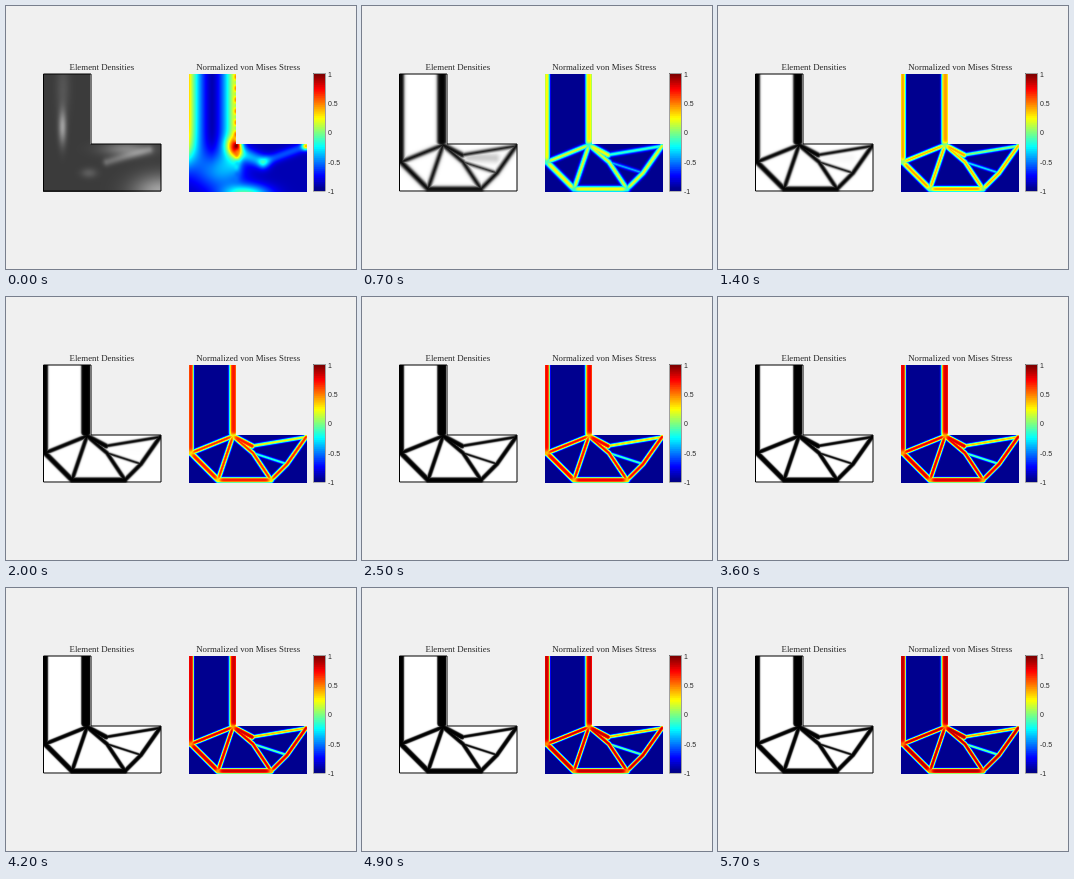
Write an HTML page with a canvas that moves like this. It is 350 px wide and 263 px high and loops after 5.8 s.

```html
<!DOCTYPE html>
<html lang="en">
<head>
<meta charset="utf-8">
<title>Stress-based topology optimization</title>
<style>
html, body { margin: 0; width: 100%; height: 100%; overflow: hidden; background: #f0f0f0; }
canvas, svg { position: absolute; left: 0; top: 0; width: 100%; height: 100%; display: block; }
.title { font: 8.85px "Liberation Serif", serif; text-anchor: middle; fill: #262626; }
.tick { font: 7px "Liberation Sans", sans-serif; fill: #262626; }
</style>
</head>
<body>
<canvas id="fields" width="350" height="263"></canvas>
<svg viewBox="0 0 350 263">
  <path d="M37.5 68H85V138H155V185H37.5Z" fill="none" stroke="#000" stroke-linejoin="round"/>
  <text class="title" x="95.8" y="64.2">Element Densities</text>
  <text class="title" x="242.2" y="64.2">Normalized von Mises Stress</text>
  <rect x="307.7" y="67.7" width="11.6" height="117.4" fill="none" stroke="#262626" stroke-width=".4"/>
  <g id="ticks"></g>
</svg>
<script>
const STEP = 100, STEPS = 58, SIZE = 118, NEUTRAL_AXIS = 23;
const ctx = document.getElementById('fields').getContext('2d');

const clamp = (v, a = 0, b = 1) => Math.min(b, Math.max(a, v));
const mix = (a, b, t) => a + (b - a) * t;
const sigmoid = v => 1 / (1 + Math.exp(-v));
const inside = (x, y) => x < 47.5 || y > 70;

// Truss joints, in pixels from the panel's top left corner
const heel = [2, 88], node = [44, 71], hub = [63, 81], bend = [64, 88];
const footLeft = [29, 115], footRight = [82, 115], knee = [98, 99], tip = [117, 72];

const chain = (half, ...points) => points.slice(1).map((to, i) => ({ half, from: points[i], to }));
const members = [
  ...chain(3, [2, -8], heel),
  ...chain(4.8, [43, -8], [43, 67]),
  ...chain(2.6, heel, footLeft, footRight),
  ...chain(2.1, footRight, knee, tip),
  ...chain(2, heel, node, footLeft),
  ...chain(2, node, bend, footRight),
  ...chain(2.5, node, hub),
  ...chain(1.5, hub, tip),
  ...chain(1.1, bend, knee)
];

function segDistance(x, y, [x1, y1], [x2, y2]) {
  const dx = x2 - x1, dy = y2 - y1;
  const t = clamp(((x - x1) * dx + (y - y1) * dy) / (dx * dx + dy * dy));
  return Math.hypot(x - x1 - t * dx, y - y1 - t * dy);
}

const blob = (x, y, [cx, cy], rx, ry = rx) => Math.exp(-(((x - cx) / rx) ** 2) - ((y - cy) / ry) ** 2);
const streak = (x, y, from, to, r) => Math.exp(-((segDistance(x, y, from, to) / r) ** 2));

function jet(v) {
  const t = clamp((v + 1) / 2);
  const band = c => 255 * clamp(1.5 - Math.abs(4 * t - c));
  return [band(3), band(2), Math.max(band(1), t < .1 ? 143 : 0)];
}

function startDensity(x, y) {
  return .77 - .38 * blob(x, y, [19.5, 53], 4, 17) - .1 * blob(x, y, [20, 14], 7, 26)
    - .28 * blob(x, y, [84, 75], 24, 7) - .2 * streak(x, y, bend, [106, 76], 4)
    - .42 * blob(x, y, [118, 118], 28, 17) - .13 * blob(x, y, [46, 99], 8, 5);
}

function startStress(x, y) {
  const column = sigmoid((84 - y) / 8) * sigmoid((51 - x) / 2);
  const bending = 1.25 * (Math.abs(x - NEUTRAL_AXIS) / NEUTRAL_AXIS) ** 1.6;
  const ripple = .3 * Math.sin(y * .55) * blob(x, 0, [48, 0], 2.5);
  return -.9 + column * (bending + ripple)
    + .5 * blob(x, y, node, 9)
    + .45 * blob(x, y, [30, 96], 24, 20)
    + .45 * streak(x, y, [48, 77], [74, 88], 7)
    + .3 * streak(x, y, [74, 88], tip, 5)
    + .85 * blob(x, y, [57, 121], 23, 10)
    + blob(x, y, tip, 4);
}

// Density and stress of the truss at one point
function trussAt(x, y, soft, peak) {
  let density = 0, load = 0;
  for (const { half, from, to } of members) {
    const depth = half - segDistance(x, y, from, to);
    density = Math.max(density, sigmoid(depth / soft));
    const isColumn = from[0] === to[0];
    const bending = isColumn ? sigmoid((Math.abs(x - NEUTRAL_AXIS) - 17.6) / .8) : 1;
    load = Math.max(load, clamp(half / 1.9) * bending * sigmoid(depth / (soft * .8 + .2)));
  }
  const relief = [node, heel, footLeft, footRight].reduce((sum, joint) => sum + blob(x, y, joint, 3), 0);
  return [density, -1 + (1 + peak) * load - .4 * load * relief];
}

function paintFields(k) {
  const left = ctx.createImageData(SIZE, SIZE), right = ctx.createImageData(SIZE, SIZE);
  const soft = .35 + .5 * Math.exp(-(k - 7) / 8);
  const peak = .3 + .4 * sigmoid((k - 16) / 2) + .22 * k / STEPS;
  const settled = 1 - (1 - clamp(k / 7)) ** 2;
  const haze = .2 * Math.exp(-Math.max(0, k - 7) / 4);

  for (let j = 0; j < SIZE; j++) for (let i = 0; i < SIZE; i++) {
    const x = i + .5, y = j + .5;
    if (!inside(x, y)) continue;
    let [density, stress] = trussAt(x, y, soft, peak);
    density = Math.max(density, haze * streak(x, y, [70, 83], [96, 84], 5));
    if (settled < 1) {
      density = mix(startDensity(x, y), density, settled);
      stress = mix(startStress(x, y), stress, settled);
    }
    const p = 4 * (j * SIZE + i), gray = 255 * (1 - clamp(density));
    left.data.set([gray, gray, gray, 255], p);
    right.data.set([...jet(stress), 255], p);
  }
  ctx.putImageData(left, 37, 68);
  ctx.putImageData(right, 183, 68);
}

function paintColorbar() {
  for (let i = 0; i < 64; i++) {
    ctx.fillStyle = `rgb(${jet(1 - 2 * i / 63).map(Math.round)})`;
    const top = 68 + i * 117 / 64;
    ctx.fillRect(308, top, 11, 185 - top);
  }
  document.getElementById('ticks').innerHTML = [1, .5, 0, -.5, -1].map((v, i) =>
    `<text class="tick" x="322" y="${71 + i * 29.2}">${v}</text>`).join('');
}

let shown = -1;
function update(now) {
  const k = Math.floor(now / STEP) % STEPS;
  if (k !== shown) paintFields(shown = k);
}

const start = performance.now();
function loop() {
  update(performance.now() - start);
  requestAnimationFrame(loop);
}
paintColorbar();
loop();
</script>
</body>
</html>
```
